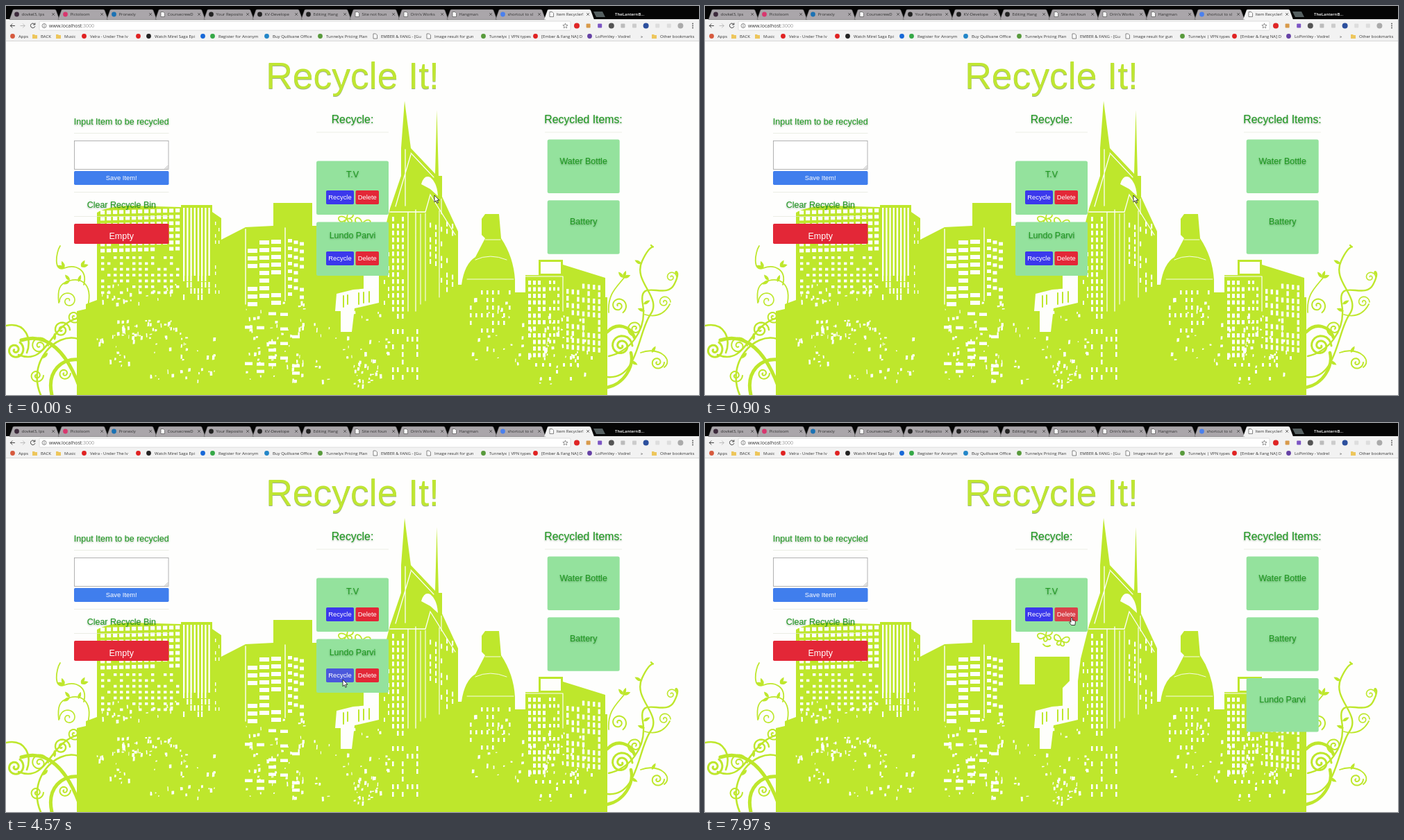
These frames come from a looping animation (998x561 px, 8 s). An HTML page:

```html
<!DOCTYPE html>
<html lang="en">
<head>
<meta charset="utf-8">
<title>Item Recycler</title>
<style>
  html, body { margin: 0; height: 100%; overflow: hidden; background: #fefefd; }
  svg { display: block; width: 100vw; height: 100vh; }
  text { font-family: "Liberation Sans", Arial, sans-serif; }
  .ui text { font: 6px "Open Sans", "Noto Sans", sans-serif; fill: #333; }
  .ui .url { font-size: 7px; }
  .mid { text-anchor: middle; }
  .head { fill: #1d991f; filter: drop-shadow(.8px 1px .8px rgba(0, 50, 0, .4)); }
  .title { fill: #bfe632; filter: drop-shadow(.8px 1px .6px rgba(80, 110, 60, .55)); }
  .label { fill: #fff; }
</style>
</head>
<body>
<svg id="stage" viewBox="0 0 998 561" preserveAspectRatio="none"></svg>
<script>
const GREEN = '#bee72c', WHITE = '#fefefb';
const BLUE = '#3b38ec', RED = '#e32737';
const LOOP = 8000, MOVED_AT = 5000;

let seed = 11;
const random = () => (seed = seed * 16807 % 2147483647) / 2147483647;

const rect = (x, y, w, h, fill, extra = '') =>
  `<rect x="${x}" y="${y}" width="${w}" height="${h}" fill="${fill}" ${extra}/>`;
const dot = (x, y, r, fill) => `<circle cx="${x}" cy="${y}" r="${r}" fill="${fill}"/>`;
const shape = (d, fill) => `<path d="${d}" fill="${fill}"/>`;
const line = (d, color, width = 1) =>
  `<path d="${d}" fill="none" stroke="${color}" stroke-width="${width}" stroke-linecap="round"/>`;
const text = (x, y, s, cls = '', size = '') =>
  `<text x="${x}" y="${y}" class="${cls}" ${size && `font-size="${size}"`}>${s.replace(/&/g, '&amp;')}</text>`;

// ---- Skyline ----

// Rows of windows; `keep` is the share left open, `lean` the drop per column.
function windows(x, y, cols, rows, dx, dy, w, h, keep = 1, lean = 0) {
  let d = '';
  for (let r = 0; r < rows; r++)
    for (let c = 0; c < cols; c++)
      if (random() < keep)
        d += `M${(x + c * dx).toFixed(1)} ${(y + r * dy + c * lean).toFixed(1)}h${w}v${h}h${-w}z`;
  return shape(d, WHITE);
}

// Ragged light specks scattered over an area.
function specks(x, y, w, h, count, size = 3) {
  let d = '';
  for (let i = 0; i < count; i++) {
    const a = 1 + random() * size, b = 1 + random() * size * 1.8;
    d += `M${(x + random() * w).toFixed(1)} ${(y + random() * h).toFixed(1)}` +
      `l${a.toFixed(1)} ${(random() - .5).toFixed(1)} ${(random() - .5).toFixed(1)} ${b.toFixed(1)} ${(-a).toFixed(1)} .5z`;
  }
  return shape(d, WHITE);
}

function spiral(cx, cy, radius, turns, start, dir, width = 2) {
  let d = '';
  for (let i = 0; i <= 40; i++) {
    const k = i / 40, r = radius * (1 - k * .9), a = start + dir * k * turns * 2 * Math.PI;
    d += `${i ? 'L' : 'M'}${(cx + r * Math.cos(a)).toFixed(1)} ${(cy + r * Math.sin(a)).toFixed(1)}`;
  }
  return line(d, GREEN, width);
}

const leaf = (x, y, angle, size = 11) =>
  `<path transform="translate(${x} ${y}) rotate(${angle}) scale(${size / 10})" d="M0 0Q4-4 10 0Q4 4 0 0" fill="${GREEN}"/>`;

const butterfly = (x, y, angle) =>
  `<g transform="translate(${x} ${y}) rotate(${angle})" fill="none" stroke="${GREEN}" stroke-width="1.8">
    <path d="M0 0C-4-9-12-9-11-3S-4 1 0 0C4-9 12-9 11-3S4 1 0 0C-6 1-7 7-3 7S0 2 0 0C6 1 7 7 3 7S0 2 0 0"/></g>`;

function skyline() {
  const silhouette = 'M102 561V440L115 437V430L131 424V298Q148 288 180 288L252 290V287H297V297L310 306V337' +
    'L345 319 385 317V284H441V317H453V377H475V337H525V372L515 382V408H537V372L541 340 553 292 569 245V205' +
    'L574 137 583 205 618 242 620.5 150 623 245H628V275L651 325V402H656Q660 372 676 362L690 335 685 330V307' +
    'L690 300H710L713 335Q731 362 733 395V413H748V388H767V366H802V373L863 392V420H866V561Z';
  return shape(silhouette, GREEN) +
    // curved block on the left
    windows(136, 295, 13, 7, 9, 9.2, 6.2, 5.4, .96, -.25) +
    windows(137, 361, 13, 7, 9, 8.4, 4.4, 3.8, .72) +
    windows(255, 291, 8, 1, 5.2, 1, 2.4, 98) +
    windows(255, 389, 8, 4, 5.2, 9, 2.2, 8, .65) +
    windows(301, 311, 2, 13, 5, 9, 1.4, 5, .5) +
    // slanted block
    line('M345 322V430M402 320V425', WHITE, 1.4) +
    windows(348, 339, 3, 9, 17, 11, 14, 6, .78, -1) +
    windows(406, 336, 3, 8, 8.5, 11, 6, 5, .85, 2.2) +
    windows(344, 440, 5, 9, 17, 10.5, 11, 4.5, .42, .8) +
    specks(345, 425, 85, 120, 60) +
    // low white front
    shape('M474 440L476 415 500 409 537 406V428L502 436 498 470H482V440Z', WHITE) +
    line('M486 418V434M492 417V430M508 414V430M515 413V428M523 412V427', GREEN, 2) +
    // tower
    shape('M598 257Q602 243 611 247 621 255 622 274L611 264Z', WHITE) +
    line('M575 207V288M583 214L561 289M553 297H604L611 272 647 330M579 297V440M590 294V440', WHITE, 1.3) +
    line('M597 300V430M604 299V425M624 295V420M583 212L616 247M627 278V300', WHITE, 1.1) +
    windows(556, 304, 3, 14, 7, 10, 3, 6.5, .85) +
    windows(610, 302, 5, 10, 8, 10.5, 2.2, 7, .55, 3) +
    windows(544, 345, 2, 9, 6, 10, 2, 6, .5) +
    windows(556, 444, 6, 9, 7, 11, 2.6, 7, .5) +
    // dome
    line('M676 366Q697 356 721 366M690 337H712M664 394H731', WHITE, .9) +
    windows(668, 410, 8, 6, 8, 11, 2.6, 6, .45) +
    // right block
    rect(770, 369, 29, 17, WHITE) +
    line('M802 390V440M748 390H802', WHITE, 1.2) +
    windows(752, 396, 4, 12, 7, 9.5, 4, 6, .75) +
    windows(782, 396, 3, 10, 6, 9.5, 3, 5, .6) +
    windows(807, 398, 7, 10, 7.6, 10, 3.4, 7, .75, .8) +
    windows(752, 505, 11, 4, 10, 10, 3, 5, .3) +
    // worn lower part
    specks(130, 400, 120, 30, 30) +
    specks(150, 452, 95, 30, 45) + specks(205, 468, 95, 72, 32) +
    specks(130, 470, 60, 60, 16) + specks(440, 440, 110, 100, 35) +
    specks(500, 508, 40, 40, 24) + specks(665, 420, 80, 100, 25) +
    specks(750, 440, 90, 105, 40) +
    butterfly(513, 314, 12) + butterfly(491, 307, -25) + line('M487 319Q491 324 497 321', GREEN, 2);
}

function vines() {
  const leftStems = line('M0 461C28 455 38 480 30 500M18 503C60 520 62 460 104 450M50 561C30 515 70 470 104 480', GREEN, 2.6) +
    line('M22 482C60 470 88 500 106 550M66 561C58 525 82 508 104 510', GREEN, 5) +
    line('M116 440C128 400 108 392 92 396S74 410 76 428M112 402C118 380 100 372 84 378S72 355 78 346', GREEN, 1.8);
  const rightStems = line('M866 535C910 540 910 470 928 445S902 398 916 368 936 352 929 345M868 505C895 500 924 470 917 430S950 425 962 402 960 382 966 386', GREEN, 2.4) +
    line('M866 550C890 545 905 520 900 500M866 470C880 455 900 462 905 478', GREEN, 4.5) +
    line('M868 442C866 415 880 405 890 392M914 500C940 490 962 510 948 521M920 445C938 450 949 443 956 430', GREEN, 1.8);
  return leftStems + rightStems +
    spiral(13, 496, 13, 1.7, -1, 1, 3) + spiral(48, 490, 13, 1.8, 0, -1) +
    spiral(80, 467, 12, 1.8, 0, -1, 2.4) + spiral(98, 448, 9, 1.6, 1, 1) +
    spiral(90, 425, 13, 1.5, 3, 1, 1.6) + spiral(44, 533, 10, 1.7, 0, 1) + spiral(84, 530, 9, 1.6, 0, 1) +
    spiral(886, 490, 16, 2, 0, -1, 3) + spiral(906, 465, 11, 1.8, 2, 1) +
    spiral(938, 514, 10, 1.6, 0, 1) + spiral(882, 432, 12, 1.7, 1, -1) +
    spiral(958, 391, 8, 1.4, 0, -1, 1.6) + spiral(948, 427, 9, 1.5, 0, -1, 1.6) +
    [[84, 378, 200], [84, 378, 250], [108, 376, -60], [108, 376, -15], [92, 396, 150], [92, 396, 230],
     [104, 398, -70], [60, 500, 130], [70, 482, -90], [889, 392, -130], [889, 392, -70], [889, 392, -20],
     [915, 372, 210], [918, 430, -30], [920, 440, 200], [930, 500, -60], [900, 512, 30]]
      .map(([x, y, a]) => leaf(x, y, a)).join('');
}

// ---- Browser frame ----

function browser() {
  const tabs = [
    ['dovkel3, Ips', '#3d2a3c'], ['Pictoloom', '#d8376e'], ['Pronexly', '#1b72b4'], ['CoursecrewD', ''],
    ['Your Reposito', '#222'], ['KV-Develope', '#222'], ['Editing Hang', '#222'], ['Site not foun', ''],
    ["Orin's Works", ''], ['Hangman', ''], ['shortcut to sl', '#4a80ee'], ['Item Recycler!', '']];
  const bookmarks = [
    [18, 'Apps', '#d65a3e'], [50, 'BACK', 'folder'], [84, 'Music', 'folder'],
    [121, 'Velra - Under The Iv', '#e02222'], [199, '', '#e02222'], [214, 'Watch Mirel Saga Epi', '#222'],
    [292, '', '#1768d8'], [306, 'Register for Anonym', '#35a847'], [384, 'Buy Quillvane Office', '#2386c8'],
    [461, 'Tunnelyx Pricing Plan', '#589a3c'], [540, 'EMBER & FANG - [Gu', ''],
    [617, 'Image result for gun', ''], [696, 'Tunnelyx | VPN types', '#589a3c'],
    [771, '[Ember & Fang NA] D', '#e02222'], [849, 'LoPimVey - Vodrel', '#6541a5'], [942, 'Other bookmarks', 'folder']];
  const page = (x, y) => `<path d="M${x - 2.5} ${y - 3.5}h3.5l2 2v5h-5.500z" fill="#fff" stroke="#555" stroke-width=".7"/>`;
  const folder = (x, y) => shape(`M${x - 3.5} ${y - 2.5}h3l1 1h3v5h-7z`, '#edc65c');
  const icon = (x, y, kind) => !kind ? page(x, y) : kind === 'folder' ? folder(x, y) : dot(x, y, 3.4, kind);

  let out = rect(0, 0, 998, 20, '#050505') + rect(0, 19, 998, 32, '#f2f2f2') + rect(0, 50, 998, .7, '#ccc');
  tabs.forEach(([label, color], i) => {
    const x = 5 + i * 70, active = i === tabs.length - 1;
    out += `<path d="M${x} 19.500L${x + 5} 5.500Q${x + 6} 5 ${x + 7} 5H${x + 65}Q${x + 66} 5 ${x + 67} 6L${x + 72} 19.500Z"
      fill="${active ? '#f2f2f2' : '#aaa6aa'}" stroke="#555" stroke-width="${active ? 0 : .5}"/>`;
    out += icon(x + 10.5, 12, color) + text(x + 17.5, 14.2, label) +
      line(`M${x + 61.5} 10.300l3.200 3.200m0-3.200l-3.200 3.200`, '#444', .8);
  });
  out += shape('M846 8h13l4 8h-13z', '#555f60') +
    `<text x="877" y="14" style="fill:#fff;font-weight:600">TheLanternB...</text>` +
    rect(48, 22, 765, 13, '#fff', 'rx="1.5" stroke="#ccc" stroke-width=".6"') +
    line('M12.500 28.500H6.500M9 25.800L6.300 28.500 9 31.200', '#444', 1) +
    line('M21 28.500H27M24.500 25.800L27.200 28.500 24.500 31.200', '#bbb', 1) +
    line('M41.500 26.500A3.300 3.300 0 1 0 41.800 29.500M41.800 24.800V27H39.500', '#444', 1) +
    `<circle cx="55" cy="28.500" r="3" fill="none" stroke="#555" stroke-width=".7"/>` +
    line('M55 28.200V30M55 26.800V27', '#555', .7) +
    '<text x="62" y="31" class="url">www.localhost<tspan fill="#999">:3000</tspan></text>' +
    `<path d="M805.500 25l1 2.400 2.600.2-2 1.700.6 2.500-2.200-1.300-2.200 1.300.6-2.500-2-1.700 2.600-.2z" fill="none" stroke="#666" stroke-width=".7"/>`;
  ['#df2525', '#d89a4a', '#7c55c4', '#555', '#bbb', '#ccc', '#2c4f9d', '#ddd', '#ddd', '#aaa']
    .forEach((color, i) => out += i % 3 ? rect(819 + i * 16.6, 25.5, 6, 6, color, 'rx="1"') : dot(822 + i * 16.6, 28.5, 4, color));
  out += [25.5, 28.5, 31.5].map(y => dot(989, y, .9, '#555')).join('');
  bookmarks.forEach(([x, label, color]) => out += icon(x - 8.500, 43.5, color) + text(x, 45.7, label));
  return `<g class="ui">${out}${text(914, 45.7, '»')}</g>`;
}

// ---- Page ----

const rule = (x, w, y) => rect(x, y, w, .7, '#e4e7dc');
const card = (x, y) => rect(x, y, 104, 77.5, '#94e29d', 'rx="2.500"');
const button = (x, y, w, h, fill, label, size, baseline, id = '') =>
  rect(x, y, w, h, fill, `rx="1.800" id="${id}"`) + text(x + w / 2, baseline, label, 'mid label', size);
const todo = (y, name, id) => card(447, y) + text(499, y + 23, name, 'mid head', 12.5) +
  button(461, y + 42.5, 40, 20, BLUE, 'Recycle', 9.4, y + 55.5, 'recycle' + id) +
  button(503.5, y + 42.5, 33.5, 20, RED, 'Delete', 9.4, y + 55.5, 'delete' + id);
const done = (y, name) => card(779.7, y) + text(831.7, y + 35, name, 'mid head', 12.5);

function content() {
  return text(499, 119, 'Recycle It!', 'mid title', 53.5) +
    text(166.300, 171, 'Input Item to be recycled', 'mid head', 12.5) + rule(98, 136.5, 183) +
    rect(98.5, 194.5, 135.5, 41, '#fff', 'stroke="#a0a0a0" stroke-width=".8"') +
    line('M229 234.500L233 230.500M231.500 234.500L233 233', '#777', .6) +
    button(98, 238, 136.5, 20, '#407eed', 'Save Item!', 9.4, 251) + rule(98, 136.5, 268) +
    text(166.300, 290.5, 'Clear Recycle Bin', 'mid head', 12.5) + rule(98, 136.5, 303) +
    button(98, 314, 136.5, 29, RED, 'Empty', 12.5, 335.5) +
    text(499, 168.5, 'Recycle:', 'mid head', 15.8) + rule(447, 104, 181.7) +
    text(831.5, 168.5, 'Recycled Items:', 'mid head', 15.8) + rule(776, 111, 181.7) +
    todo(223.5, 'T.V', 1) + `<g id="waiting">${todo(311.5, 'Lundo Parvi', 2)}</g>` +
    done(192.5, 'Water Bottle') + done(280.300, 'Battery') +
    `<g id="recycled">${done(368, 'Lundo Parvi')}</g>`;
}

const pointer = `<g id="pointer" fill="#fff" stroke="#111" stroke-width=".8" stroke-linejoin="round">
  <path id="arrow" d="M0 0V9.800L2.300 7.700 3.900 11.300 5.500 10.600 3.900 7.100H7Z"/>
  <path id="hand" d="M-1 1Q0-.6 1 1V4.500L4.500 5.200Q5.600 5.500 5.400 7L4.800 11.500H-.4L-3.300 7.600Q-3.400 6-1 7.300Z"/></g>`;

const get = id => document.getElementById(id);
get('stage').innerHTML = rect(0, 0, 998, 561, '#fefefd') + vines() + skyline() + browser() + content() + pointer;

// ---- Motion ----

const path = [[0, 617, 273], [900, 617, 273], [1750, 569, 264], [1950, 569, 264], [2900, 575, 433],
  [3300, 575, 433], [4500, 485, 370], [5500, 485, 370], [6300, 480, 403], [6800, 480, 403], [7800, 528, 280], [LOOP, 528, 280]];

function pointerAt(t) {
  const i = path.findIndex(p => p[0] > t);
  const [t0, x0, y0] = path[i - 1], [t1, x1, y1] = path[i];
  const k = (t - t0) / (t1 - t0), e = k * k * (3 - 2 * k);
  return [x0 + (x1 - x0) * e, y0 + (y1 - y0) * e];
}

const show = (id, on) => get(id).setAttribute('visibility', on ? 'visible' : 'hidden');

function frame() {
  const t = performance.now() % LOOP, moved = t >= MOVED_AT;
  const [x, y] = pointerAt(t);
  const within = (left, top, w) => x > left && x < left + w && y > top && y < top + 20;
  const overRecycle = !moved && within(461, 354, 40), overDelete = within(503.5, 266, 33.5);
  show('waiting', !moved);
  show('recycled', moved);
  get('recycle2').setAttribute('fill', overRecycle ? '#4b58dc' : BLUE);
  get('delete1').setAttribute('fill', overDelete ? '#d9424a' : RED);
  const hand = overDelete || overRecycle && t > 4620;
  show('hand', hand);
  show('arrow', !hand);
  get('pointer').setAttribute('transform', `translate(${x} ${y})`);
  requestAnimationFrame(frame);
}
frame();
</script>
</body>
</html>
```
